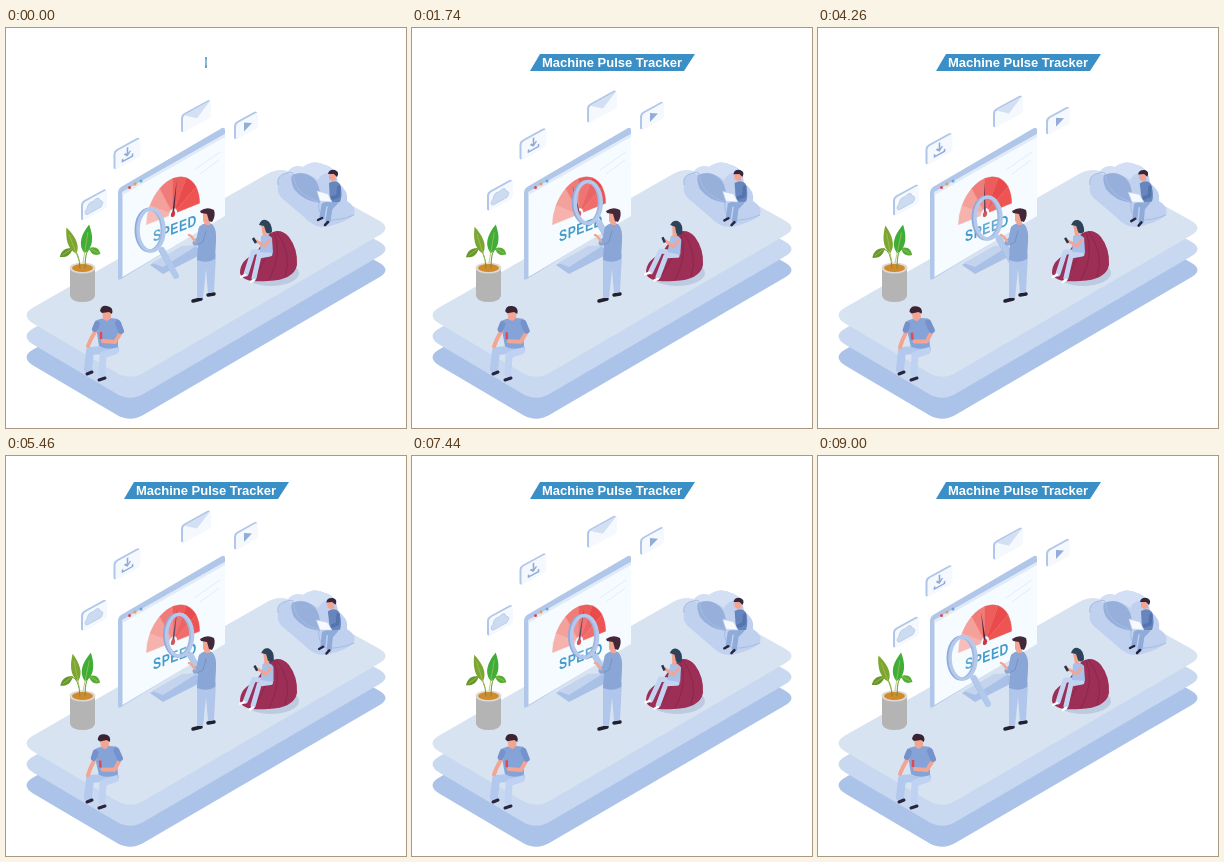
Animation of 400x400 px, one loop 9030 ms. Source, as an HTML page:

```html
<!DOCTYPE html>
<html lang="en">
<head>
<meta charset="utf-8">
<title>Isometric speed scene</title>
<style>
  html, body { margin: 0; width: 100%; height: 100%; overflow: hidden; background: #fff; }
  svg { display: block; width: 100vw; height: 100vh; }
  text { font-family: "Liberation Sans", Arial, sans-serif; font-weight: bold; }
  .limb { fill: none; stroke-linecap: round; stroke-linejoin: round; }
</style>
</head>
<body>
<svg viewBox="0 0 400 400">
  <defs>
    <path id="slab" d="M28 279L261 146Q275 138 289 146L372 192Q387 200 372 208L139 344Q125 353 111 345L28 296Q13 287 28 279Z"/>
  </defs>

  <use href="#slab" y="42" fill="#abc3e8"/>
  <use href="#slab" y="21" fill="#c8d8f0"/>
  <use href="#slab" fill="#d8e3f1"/>

  <!-- Cloud seat -->
  <g>
    <path fill="#c0d1ef" d="M272 157Q270 147 281 145Q286 136 297 139Q308 131 319 137Q330 139 332 155Q343 163 341 173Q351 179 348 187Q341 194 320 199Q308 200 298 189L278 172Q270 166 272 157Z"/>
    <path fill="#d2dff4" d="M281 145Q286 136 297 139Q308 131 319 137Q326 139 329 146Q318 142 312 152Q301 143 290 148Z"/>
    <path fill="#97afdb" d="M286 147Q300 141 310 153Q315 160 314 175Q297 173 288 161Q284 152 286 147Z"/>
    <path fill="none" stroke="#a5bce4" d="M272 157Q270 147 281 145Q289 142 288 151Q291 167 313 174Q311 185 320 192Q333 193 348 187"/>
  </g>
  <g id="reader">
    <path class="limb" stroke="#8fabd9" stroke-width="5" d="M330 173L318 177L316 189M330 174L324 180L322 193"/>
    <path class="limb" stroke="#29253f" stroke-width="2.500" d="M316 190L312 192M322 194L319 197"/>
    <path fill="#6886be" d="M323 155Q330 151 334 156Q337 166 334 174L324 174Z"/>
    <path fill="#f2a491" d="M323 145H329L330 152L326 153L323 151Z"/>
    <path fill="#33283f" d="M322 146Q323 141 329 142Q334 144 331 149L328 146Z"/>
    <path class="limb" stroke="#5474ae" stroke-width="3.500" d="M333 159L332 168L326 170"/>
    <path fill="#f6faff" stroke="#c4d4ec" stroke-width=".6" d="M311 163L322 166L326 174L314 173Z"/>
  </g>

  <!-- Monitor -->
  <path fill="#a9c0e7" d="M144 237L174 220L190 218L196 226L157 246Z"/>
  <path fill="#c4d4ef" d="M146 235L176 218L192 217L157 239Z"/>
  <path fill="#b0c7e9" d="M112 164Q112 161 115 159L216 100Q219 99 219 102V187L115 251Q112 253 112 250Z"/>
  <path fill="#f5fbfe" d="M116.500 164L219 106V188L116.500 249Z"/>
  <path fill="#e1ebf8" d="M116.500 164L219 106V109L116.500 167Z"/>
  <path stroke="#e3eef8" d="M188 142L214 124M194 146L213 132"/>
  <circle cx="123.500" cy="159.500" r="1.500" fill="#e4484d"/>
  <circle cx="129" cy="156" r="1.500" fill="#ef9a45"/>
  <circle cx="135" cy="153" r="1.500" fill="#6ba5d8"/>
  <g transform="matrix(.86 -.35 0 1.15 167 186)">
    <g id="gauge"></g>
    <g id="needle"><path fill="#4c2744" d="M-1.200 1L0 -28L1.200 1Z"/></g>
    <circle r="2.500" fill="#c93842"/>
  </g>
  <text transform="matrix(.87 -.34 0 1.1 147 214)" font-size="14" letter-spacing=".6" fill="#459bcc">SPEED</text>

  <!-- Magnifier -->
  <g id="lens">
    <path class="limb" stroke="#8da9d7" stroke-width="3" d="M9 20L24 47"/>
    <path class="limb" stroke="#b3c9eb" stroke-width="6" d="M11 20L25 46"/>
    <ellipse cx="-2" rx="13" ry="21" fill="none" stroke="#8faada" stroke-width="3"/>
    <ellipse rx="13" ry="21" fill="#f3f8ff" fill-opacity=".15" stroke="#b4c9eb" stroke-width="3.500"/>
  </g>

  <!-- Standing man -->
  <g>
    <path class="limb" stroke="#202030" stroke-width="3.500" d="M195 271L187 273M208 266L202 267"/>
    <path fill="#b0c6ea" d="M191 228L210 226L208 264L202 265L200 241L197 270L191 270Z"/>
    <path fill="#8aa6d6" d="M193 199Q199 193 206 196Q211 201 210 213L209 231Q201 236 191 232Z"/>
    <path class="limb" stroke="#8aa6d6" stroke-width="5" d="M195 201L193 211L189 215"/>
    <path class="limb" stroke="#f2a592" stroke-width="2.500" d="M189 213L185 208L183 207"/>
    <path class="limb" stroke="#7392c9" stroke-width="1" d="M200 203L197 214L191 217"/>
    <path fill="#f2a592" d="M197 184L204 184L204 197L200 197L197 193Z"/>
    <path fill="#43283a" d="M194 183Q201 178 208 182Q210 188 206 194L203 193L201 186L195 185Z"/>
  </g>

  <!-- Bean bag -->
  <ellipse cx="265" cy="245" rx="28" ry="13" fill="#bdcbe1"/>
  <path fill="#9d2e55" d="M263 206Q274 199 283 209Q292 221 291 237Q288 252 262 253Q236 255 234 245Q234 232 249 226Z"/>
  <path fill="none" stroke="#842649" stroke-width=".8" d="M270 203Q287 225 279 249M268 204Q277 226 263 252M265 205Q263 232 246 252M251 226Q239 234 237 249"/>
  <g id="woman">
    <path class="limb" stroke="#c3d4f2" stroke-width="5" d="M262 224L247 224L240 246M264 226L253 228L248 250"/>
    <path class="limb" stroke="#fff" stroke-width="2.500" d="M239 247L235 249M248 252L245 254"/>
    <path fill="#a9c0e8" d="M255 208Q261 204 266 210L267 225L254 224Z"/>
    <path class="limb" stroke="#f2a592" stroke-width="3" d="M263 212L259 218L250 213"/>
    <path stroke="#26344a" stroke-width="2.500" d="M247 210L250 215"/>
    <path fill="#f2a592" d="M255 197H261V208H257Z"/>
    <path fill="#2d435a" d="M253 197Q255 191 260 192Q266 194 266 204Q262 207 260 204L258 198Z"/>
  </g>

  <!-- Plant -->
  <g>
    <path fill="#b4b4b4" d="M64 240V268Q66 274 76.500 274Q87 274 89 268V240Z"/>
    <ellipse cx="76.500" cy="240" rx="13" ry="5.500" fill="#ddd9d3"/>
    <ellipse cx="76.500" cy="240" rx="10.500" ry="4" fill="#d18a2d"/>
    <path class="limb" stroke="#5f9a35" d="M74 240Q73 222 66 221M79 240Q79 221 84 221"/>
    <g id="plant"></g>
  </g>

  <!-- Seated man -->
  <g>
    <path class="limb" stroke="#b3c8ed" stroke-width="8" d="M109 321L84 323L82 341"/>
    <path class="limb" stroke="#c0d2f1" stroke-width="7" d="M109 323L97 327L96 345"/>
    <path class="limb" stroke="#29253f" stroke-width="3" d="M86 344L81 346M99 350L93 352"/>
    <g id="sitter">
      <path fill="#86a3d8" d="M89 293Q98 288 112 291L118 304L112 307V319Q102 323 93 318Z"/>
      <path class="limb" stroke="#f2a592" stroke-width="4" d="M90 302L85 311L82 318M114 306L109 314L97 313"/>
      <path class="limb" stroke="#7592cd" stroke-width="6" d="M91 296L89 301M112 295L115 303"/>
      <path stroke="#df4a52" stroke-width="2.500" d="M95 304V311"/>
      <path fill="#f2a592" d="M96 282H105V290L101 293L97 291Z"/>
      <path fill="#3a2433" d="M94 283Q95 277 101 278Q108 279 106 286L103 284L96 285Z"/>
    </g>
  </g>

  <g id="cards"></g>

  <g id="banner">
    <path fill="#398fc6" d="M-72 -8.500H83L72 8.500H-82Z"/>
    <text y="4.500" font-size="13" text-anchor="middle" fill="#fff">Machine Pulse Tracker</text>
  </g>
</svg>
<script>
  const LOOP = 9030;
  const $ = id => document.getElementById(id);
  const place = (el, value) => el.setAttribute("transform", value);

  // Gauge wedges, pale on the left to deep red on the right
  const reds = ["#f6b3ae", "#f4a09b", "#f07c79", "#ed5d5c", "#e94b4c", "#ee5552"];
  const polar = (r, a) => `${-r * Math.cos(a)} ${-r * Math.sin(a)}`;
  $("gauge").innerHTML = reds.map((fill, i) => {
    const a = i * Math.PI / 6, b = a + Math.PI / 6;
    return `<path fill="${fill}" stroke="${fill}" stroke-width=".3"
      d="M${polar(31, a)}A31 31 0 0 1 ${polar(31, b)}L${polar(5, b)}A5 5 0 0 0 ${polar(5, a)}Z"/>`;
  }).join("");

  // Cards: left, top, width, height, symbol
  const symbols = {
    cloud: '<path fill="#cddbf1" stroke="#b3c8e9" stroke-width=".7" d="M6 16Q2 13 6 10Q7 4 12 6Q18 3 19 9Q24 12 20 16Z"/>',
    down: '<path fill="none" stroke="#8faad7" stroke-width="1.600" d="M14 4V12M11 9L14 12L17 9M9 13V15.500H19V13"/>',
    mail: '<path fill="#d3e0f4" d="M3 2H29L16 12Z"/>',
    play: '<path fill="#93add9" d="M10 5L18 10L10 14Z"/>'
  };
  const cards = [
    [75, 174, 25, 19, "cloud"], [107.5, 123, 26, 19, "down"],
    [175, 87, 29, 18, "mail"], [228, 95, 23, 17, "play"]
  ];
  $("cards").innerHTML = cards.map(([x, y, w, h, icon]) =>
    `<g transform="matrix(1 -.55 0 1 ${x} ${y})">
      <rect width="${w}" height="${h}" rx="3" fill="#b0c6ea"/>
      <rect x="2" y="2" width="${w - 1}" height="${h - 1}" rx="2.500" fill="#f5f9fe"/>${symbols[icon]}</g>`
  ).join("");

  // Leaves: base, wide angle, narrow angle, length, half width, colour
  const leaves = [
    [67, 220, -124, -128, 16, 3.5, "#66972d"], [83, 220, 118, 122, 13, 3.5, "#55ad36"],
    [74, 235, -21, -10, 38, 4.5, "#7ca632"], [77, 235, 9, 12, 39, 5.5, "#3fae38"]
  ];
  $("plant").innerHTML = leaves.map(([, , , , n, w, fill]) => {
    const stem = n > 20 ? -10 : 0;
    return `<g><path fill="${fill}" d="M0 ${stem}C${-w * 1.6} ${-n * .45} ${-w} ${-n * .75} 0 ${-n}C${w} ${-n * .75} ${w * 1.6} ${-n * .45} 0 ${stem}"/>
      <path stroke="#a9bf55" stroke-width=".7" d="M0 0V${-n * .8}"/></g>`;
  }).join("");

  const lensPath = [[0, 145, 202], [810, 160, 173], [2760, 194, 176], [4260, 170, 190],
    [6600, 177, 169], [8280, 168, 192], [9000, 145, 202], [LOOP, 145, 202]];
  const needlePath = [[0, 9], [810, 0], [2760, -32], [4260, -2], [6600, 22], [8280, 2], [LOOP, -10]];

  function track(keys, t) {
    const i = keys.findIndex(k => k[0] > t), a = keys[i - 1], b = keys[i];
    const p = (t - a[0]) / (b[0] - a[0]);
    return a.slice(1).map((v, j) => v + (b[j + 1] - v) * p);
  }

  function draw(t) {
    const wave = Math.cos(2 * Math.PI * t / LOOP);
    const bob = t * 4 / LOOP % 1;
    place($("cards"), `translate(0 ${-21 * (1 - Math.abs(1 - 2 * bob))})`);
    place($("lens"), `translate(${track(lensPath, t)})`);
    place($("needle"), `rotate(${track(needlePath, t)})`);
    place($("woman"), `rotate(${4.5 - 4.5 * Math.cos(4 * Math.PI * t / LOOP)} 255 235)`);
    place($("reader"), `rotate(${2 * wave - 2} 328 174)`);
    place($("sitter"), `rotate(${2 * wave - 2} 103 320)`);
    leaves.forEach(([x, y, wide, narrow], i) =>
      place($("plant").children[i], `translate(${x} ${y}) rotate(${wide + (narrow - wide) * (1 - wave) / 2})`));

    const p = Math.min(1, Math.max(0, (t - 30) / 720));
    const grow = 1 - (1 - p) ** 2;
    place($("banner"), `translate(200 34.500) scale(${Math.max(.01, grow)} ${.65 + .35 * grow})`);
  }

  const start = performance.now();
  function tick() {
    draw((performance.now() - start) % LOOP);
    requestAnimationFrame(tick);
  }
  tick();
</script>
</body>
</html>
```
